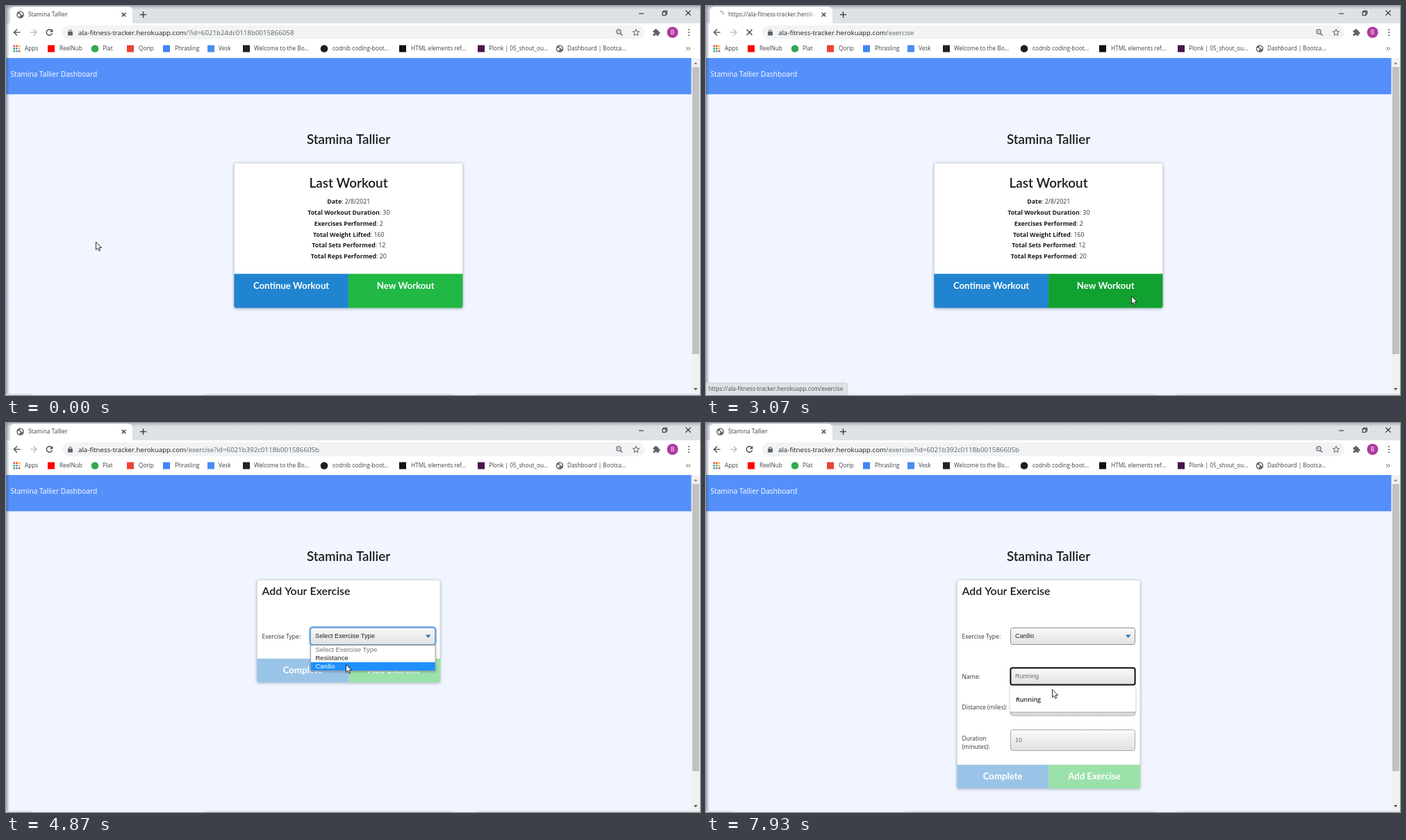
Animation, 999 px wide and 561 px high, one loop 8000 ms. Source, as an HTML page with a canvas:

```html
<!DOCTYPE html>
<html lang="en">
<head>
<meta charset="utf-8">
<title>Workout form demo</title>
<style>
html, body { margin: 0; width: 100%; height: 100%; overflow: hidden; background: #f0f5ff; }
canvas { display: block; width: 999px; height: 561px; }
</style>
</head>
<body>
<canvas id="stage"></canvas>
<script>
const W = 999, H = 561, LOOP = 8000;
const canvas = document.getElementById('stage');
const ctx = canvas.getContext('2d');
const dpr = window.devicePixelRatio || 1;
canvas.width = W * dpr;
canvas.height = H * dpr;

const UI = '"Open Sans", "Noto Sans", sans-serif';
const HEAD = 'Lato, sans-serif';
const FORM = '"Liberation Sans", Arial, sans-serif';
const INK = '#202124', GREY = '#5f6368';
const APP = 'Stamina Tallier';
const HOST = 'ala-fitness-tracker.herokuapp.com';

// Moments of the story, in ms
const HOVER = 2330, STATUS = 2400, CLICK = 2600, PAGE = 3270, ID = 3470, LOADED = 3870;
const OPEN = 4130, PICK = 5930, FOCUS = 7000, SUGGEST = 7065;

// Pointer stops: time, x, y
const STOPS = [
  [0, 129, 340], [500, 129, 340], [1200, 203, 264.5], [1400, 203, 264.5],
  [1600, 383, 314], [1980, 383, 314], [2540, 612, 418], [3080, 612, 418],
  [3640, 497, 309], [4100, 497, 309], [4400, 497, 317], [4570, 497, 317],
  [4870, 489, 348], [6080, 489, 348], [6580, 496, 360], [7500, 496, 360], [7930, 498, 384]
];

const BOOKMARKS = [
  [65, 77, 'ReelNub', '#f00', 0], [128, 139, 'Plat', '#34a853', 1],
  [179, 191, 'Qorip', '#ea4335', 0], [231, 243, 'Phrasling', '#4285f4', 0],
  [295, 306, 'Vesk', '#4a8df0', 0], [346, 357, 'Welcome to the Bo...', '#202124', 0],
  [458, 470, 'codnib coding-boot...', '#1b1f23', 1], [571, 583, 'HTML elements ref...', '#111', 0],
  [684, 695, 'Plonk | 05_shout_ou...', '#4a154b', 0], [797, 808, 'Dashboard | Bootca...', '', 2]
];

const STATS = [
  ['Date', '2/8/2021'], ['Total Workout Duration', '30'], ['Exercises Performed', '2'],
  ['Total Weight Lifted', '160'], ['Total Sets Performed', '12'], ['Total Reps Performed', '20']
];

function rect(x, y, w, h, fill) {
  ctx.fillStyle = fill;
  ctx.fillRect(x, y, w, h);
}

function round(x, y, w, h, r, fill, stroke, line = 1) {
  ctx.beginPath();
  ctx.roundRect(x, y, w, h, r);
  if (fill) { ctx.fillStyle = fill; ctx.fill(); }
  if (stroke) { ctx.strokeStyle = stroke; ctx.lineWidth = line; ctx.stroke(); }
}

function disc(x, y, r, fill) {
  ctx.beginPath();
  ctx.arc(x, y, r, 0, Math.PI * 2);
  ctx.fillStyle = fill;
  ctx.fill();
}

function path(points, color, width = 1.2, closed = false) {
  ctx.beginPath();
  points.forEach(([x, y]) => ctx.lineTo(x, y));
  if (closed) ctx.closePath();
  ctx.strokeStyle = color;
  ctx.lineWidth = width;
  ctx.stroke();
}

function poly(points, fill) {
  ctx.beginPath();
  points.forEach(([x, y]) => ctx.lineTo(x, y));
  ctx.closePath();
  ctx.fillStyle = fill;
  ctx.fill();
}

function arc(x, y, r, from, to, color, width) {
  ctx.beginPath();
  ctx.arc(x, y, r, from, to);
  ctx.strokeStyle = color;
  ctx.lineWidth = width;
  ctx.stroke();
}

// Draws with a soft drop shadow
function raised(alpha, blur, paint) {
  ctx.save();
  ctx.shadowColor = `rgba(50,55,70,${alpha})`;
  ctx.shadowBlur = blur * dpr;
  ctx.shadowOffsetY = dpr;
  paint();
  ctx.restore();
}

// y is the middle of the capitals; returns the advance width
function text(s, x, y, size, color, font = UI, weight = 400, align = 'left') {
  ctx.font = `${weight} ${size}px ${font}`;
  ctx.textAlign = align;
  ctx.fillStyle = color;
  ctx.fillText(s, x, y + size * 0.36);
  return ctx.measureText(s).width;
}

function cross(x, y, r, color, width) {
  path([[x - r, y - r], [x + r, y + r]], color, width);
  path([[x - r, y + r], [x + r, y - r]], color, width);
}

function globe(x, y) {
  disc(x, y, 5.3, GREY);
  poly([[x - 4, y - 1], [x - 1, y - 1], [x + 0.5, y + 1], [x - 1, y + 2], [x - 1, y + 4], [x - 3.6, y + 2]], '#fff');
  poly([[x, y - 4], [x + 2.6, y - 3.2], [x + 4, y], [x + 2, y + 1], [x + 1.5, y - 1], [x - 1, y - 2]], '#fff');
}

function drawTabs(t) {
  rect(0, 0, W, 26, '#dee1e6');
  const top = ctx.createLinearGradient(0, 0, 0, 5);
  top.addColorStop(0, 'rgba(110,115,130,.4)');
  top.addColorStop(1, 'rgba(110,115,130,0)');
  rect(0, 0, W, 5, top);
  round(6, 1, 176, 26, [6, 6, 0, 0], '#fff');
  if (t >= CLICK && t < LOADED) {
    const a = -Math.PI / 2 - (t - 3070) / 1000 * 4.6;
    arc(20.5, 12.5, 4.8, a, a + 1.5, '#858a90', 1.3);
    ctx.save();
    ctx.beginPath();
    ctx.rect(32, 2, 127, 22);
    ctx.clip();
    text('https://' + HOST, 32, 12.5, 8.3, '#3c4043');
    ctx.restore();
    const fade = ctx.createLinearGradient(144, 0, 159, 0);
    fade.addColorStop(0, 'rgba(255,255,255,0)');
    fade.addColorStop(1, '#fff');
    rect(144, 4, 16, 19, fade);
  } else {
    globe(20.5, 12.5);
    text(APP, 32, 12.5, 8.3, '#3c4043');
  }
  cross(169.5, 12.5, 2.8, '#3c4043', 1.3);
  path([[193, 12.5], [202, 12.5]], '#3c4043', 1.4);
  path([[197.5, 8], [197.5, 17]], '#3c4043', 1.4);
  path([[911, 11], [918, 11]], '#222', 1);
  path([[946.5, 8], [946.5, 7], [951.5, 7], [951.5, 12], [950.5, 12]], '#222', 1);
  ctx.strokeRect(945, 8.5, 4.8, 4.8);
  cross(982, 10, 3.7, '#222', 1.1);
}

function backArrow(x, dir, color) {
  path([[x - 4.5 * dir, 38], [x + 4.5 * dir, 38]], color, 1.3);
  path([[x, 33.5], [x - 4.5 * dir, 38], [x, 42.5]], color, 1.3);
}

function drawToolbar(t) {
  rect(0, 25, W, 50, '#fff');
  backArrow(16, 1, '#45494d');
  backArrow(39.5, -1, '#b4b7ba');
  if (t >= CLICK && t < LOADED) cross(62.5, 38, 3.9, '#45494d', 1.4);
  else {
    arc(62.5, 38, 4.2, 0.3, 5.5, '#45494d', 1.4);
    poly([[67.3, 33], [67.3, 37.6], [62.8, 37.6]], '#45494d');
  }
  round(81, 28, 838, 20, 10, '#f1f3f4');
  round(89, 37, 7, 5.5, 0.8, GREY);
  arc(92.5, 36.8, 2, Math.PI, 0, GREY, 1.1);
  const url = t < CLICK ? '/?id=6021b24dc0118b0015866058'
    : t < ID ? '/exercise' : '/exercise?id=6021b392c0118b001586605b';
  const w = text(HOST, 104, 38, 9.73, INK);
  text(url, 104 + w, 38, 9.73, GREY);

  arc(882, 37, 3.1, 0, 6.3, GREY, 1.2);
  path([[884.4, 39.4], [887.4, 42.4]], GREY, 1.4);
  path([[880.6, 37], [883.4, 37]], GREY, 0.8);
  const star = Array.from({ length: 10 }, (_, i) => {
    const r = i % 2 ? 2.1 : 5, a = -Math.PI / 2 + i * Math.PI / 5;
    return [907 + r * Math.cos(a), 38.4 + r * Math.sin(a)];
  });
  path(star, GREY, 1, true);
  round(931.5, 35, 8, 8, 1, GREY);
  disc(935.5, 34.7, 1.8, GREY);
  disc(939.8, 39, 1.8, GREY);
  disc(932, 39, 1.3, '#fff');
  disc(935.5, 42.8, 1.3, '#fff');
  disc(959.5, 38, 8, '#b03aa0');
  text('B', 959.5, 38, 8.4, '#fff', UI, 400, 'center');
  [34, 38, 42].forEach(y => disc(983, y, 1.1, GREY));

  const dots = ['#ea4335', '#ea4335', '#fbbc04', '#34a853', '#4285f4', '#fbbc04', '#34a853', '#4285f4', '#ea4335'];
  dots.forEach((c, i) => rect(10.5 + i % 3 * 3.7, 56.5 + Math.floor(i / 3) * 3.7, 2.5, 2.5, c));
  text('Apps', 27, 61.5, 8.25, '#3c4043');
  for (const [x, tx, label, color, kind] of BOOKMARKS) {
    if (kind === 2) globe(x, 61.5);
    else if (kind) disc(x, 61.5, 5.3, color);
    else rect(x - 5, 56.5, 10, 10, color);
    text(label, tx, 61.5, 8.25, '#3c4043');
  }
  [979.5, 982.5].forEach(x => path([[x, 59.3], [x + 2, 61.5], [x, 63.7]], '#45494d', 1));
}

function drawFrame() {
  rect(0, 75, W, H - 75, '#f0f5ff');
  rect(0, 75, 986.7, 52.3, '#5590fa');
  text(APP + ' Dashboard', 6.5, 98.4, 10.2, '#fff');
  text(APP, 493, 192.7, 18.8, '#1b1c1d', HEAD, 600, 'center');
  rect(986.7, 75, 12.3, H - 75, '#f1f1f1');
  rect(988, 88, 10, 414, '#c1c1c1');
  poly([[990, 84], [995.5, 84], [992.7, 81]], '#8b8b8b');
  poly([[990, 551], [995.5, 551], [992.7, 554.2]], '#505050');
}

function card(x, y, w, h) {
  raised(0.4, 4, () => round(x, y, w, h, 3, '#fff'));
  round(x, y, w, h, 3, null, '#d4d4d8', 0.8);
}

function buttons(x, y, w, h, labels, colors, labelY) {
  const half = w / 2;
  round(x, y, half, h, [0, 0, 0, 3], colors[0]);
  round(x + half, y, half, h, [0, 0, 3, 0], colors[1]);
  labels.forEach((s, i) => text(s, x + half * (i + 0.5), labelY, 13.2, '#fff', HEAD, 700, 'center'));
}

function drawSummary(t) {
  card(328.3, 226.4, 329.2, 209);
  text('Last Workout', 493, 255.4, 18.9, '#1b1c1d', HEAD, 600, 'center');
  STATS.forEach(([name, value], i) => {
    const y = 282.1 + i * 15.75, size = 8.8;
    ctx.font = `700 ${size}px ${UI}`;
    const nameW = ctx.measureText(name).width;
    ctx.font = `400 ${size}px ${UI}`;
    const rest = ': ' + value;
    const x = 493.3 - (nameW + ctx.measureText(rest).width) / 2;
    text(name, x, y, size, '#1b1c1d', UI, 700);
    text(rest, x + nameW, y, size, '#333');
  });
  const green = t < HOVER ? '#21b845' : t < CLICK ? '#16ab39' : '#10a131';
  buttons(328.3, 386.3, 329.2, 49.1, ['Continue Workout', 'New Workout'], ['#2084d0', green], 403.4);
}

function field(y, h, value, color, border = '#a9a9ab') {
  const g = ctx.createLinearGradient(0, y, 0, y + h);
  g.addColorStop(0, '#fafafa');
  g.addColorStop(1, '#e0e0e1');
  round(438.5, y + 0.5, 179, h - 1, 3, g, border, 1);
  text(value, 445, y + h / 2 - 0.4, 9.2, color, FORM);
}

function drawMenu(pointerY) {
  raised(0.35, 3, () => rect(438, 320, 180.5, 38, '#fff'));
  const active = pointerY >= 345 ? 2 : pointerY >= 333 ? 1 : -1;
  ['Select Exercise Type', 'Resistance', 'Cardio'].forEach((s, i) => {
    const y = 326.3 + i * 12.2;
    if (i === active) rect(439, y - 5.7, 179, 12.2, '#1e90ff');
    text(s, 445.5, y, 9.5, i === active ? '#fff' : i ? INK : '#757575', FORM);
  });
  ctx.strokeStyle = '#85888c';
  ctx.lineWidth = 0.8;
  ctx.strokeRect(438.5, 320.5, 179.5, 37.2);
}

function label(s, y) {
  text(s, 368.5, y, 8.55, '#303134');
}

function drawForm(t, pointerY) {
  const cardio = t >= PICK;
  const bottom = cardio ? 527 : 374;
  card(361.3, 226.4, 263.6, bottom - 226.4);
  text('Add Your Exercise', 368.5, 242.3, 15.95, '#1b1c1d', HEAD, 600);
  label('Exercise Type:', 308.3);
  field(295, 25, cardio ? 'Cardio' : 'Select Exercise Type', INK, '#8b8c90');
  poly([[604, 305.5], [611.5, 305.5], [607.7, 310]], '#1b78b8');
  if (t >= OPEN && t < FOCUS) round(437.5, 294.5, 181, 26, 4, null, '#70aae4', 2.4);
  const top = bottom - 34.3;
  buttons(361.3, top, 263.6, 34.3, ['Complete', 'Add Exercise'], ['#9ac4e7', '#9be1aa'], top + 17);
  if (cardio) {
    label('Name:', 365.8);
    label('Distance (miles):', 410.3);
    label('Duration', 454.8);
    label('(minutes):', 467.3);
    field(352.5, 25.5, 'Running', '#6c6c6c');
    field(397, 25.5, '5', '#6c6c6c');
    field(442, 31, '10', '#6c6c6c');
    if (t >= FOCUS) round(438.4, 353.2, 179.2, 24.2, 2.5, null, '#101010', 2);
    if (t >= SUGGEST) {
      raised(0.4, 3, () => round(437.5, 379.5, 181, 37, 2, '#fff'));
      text('Running', 446, 398.3, 9, '#26282b', UI, 600);
    }
  } else if (t >= OPEN) drawMenu(pointerY);
}

function drawEdges(t) {
  const g = ctx.createLinearGradient(0, 0, 5, 0);
  g.addColorStop(0, 'rgba(60,68,100,.45)');
  g.addColorStop(1, 'rgba(60,68,100,0)');
  rect(0, 0, 5, H, g);
  rect(0, 559.5, W, 1.5, '#dcdfe6');
  rect(37, 560, 250, 1, '#fff');
  rect(645, 560, 33, 1, '#fff');
  if (t >= STATUS && t < PAGE) {
    round(0, 543.5, 204, 18, [0, 4, 0, 0], '#dee1e6', '#c9ccd1', 0.7);
    text('https://' + HOST + '/exercise', 3.5, 552.3, 8.25, '#4b4f53');
  }
}

function pointerAt(t) {
  let i = STOPS.length - 1;
  while (i && STOPS[i][0] > t) i--;
  const a = STOPS[i], b = STOPS[i + 1] || a;
  const p = b === a ? 0 : (t - a[0]) / (b[0] - a[0]);
  const e = p * p * (3 - 2 * p);
  return [a[1] + (b[1] - a[1]) * e, a[2] + (b[2] - a[2]) * e];
}

function drawPointer(t, x, y) {
  if (t >= PICK && y >= 353 && y < 378) {
    path([[x - 2.5, y - 5.5], [x, y - 5], [x + 2.5, y - 5.5]], '#222', 1);
    path([[x, y - 5], [x, y + 5]], '#222', 1.1);
    path([[x - 2.5, y + 5.5], [x, y + 5], [x + 2.5, y + 5.5]], '#222', 1);
    return;
  }
  const shape = [[0, 0], [0, 11.4], [2.6, 9], [4.4, 13], [6.2, 12.2], [4.5, 8.3], [8, 8.2]]
    .map(([dx, dy]) => [x + 0.5 + dx, y + 0.3 + dy]);
  poly(shape, '#fff');
  path(shape, '#1a1a1a', 0.9, true);
}

function draw(t) {
  ctx.setTransform(dpr, 0, 0, dpr, 0, 0);
  const [x, y] = pointerAt(t);
  drawFrame();
  drawTabs(t);
  drawToolbar(t);
  if (t < PAGE) drawSummary(t);
  else drawForm(t, y);
  drawEdges(t);
  drawPointer(t, x, y);
}

const start = performance.now();
function tick() {
  draw((performance.now() - start) % LOOP);
  requestAnimationFrame(tick);
}
tick();
</script>
</body>
</html>
```
